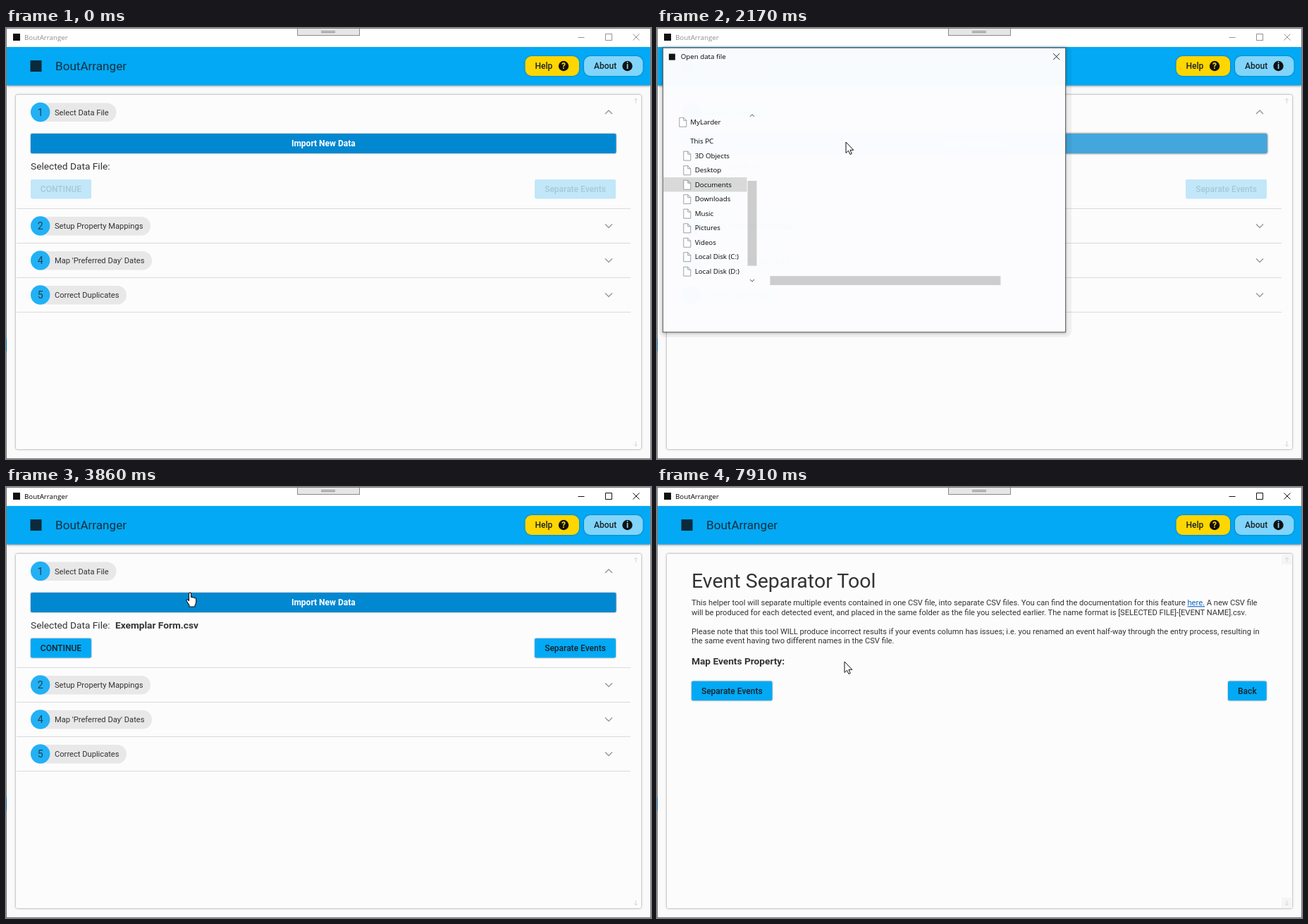
Write an HTML page that moves like this. It is 915 by 612 pixels and loops after 8000 ms.

```html
<!DOCTYPE html>
<html lang="en">
<head>
<meta charset="utf-8">
<title>BoutArranger</title>
<style>
html, body { margin: 0; width: 100%; height: 100%; overflow: hidden; background: #fafafa; }
svg { display: block; width: 915px; height: 612px; cursor: default; user-select: none; }
text { font-family: Roboto, sans-serif; font-size: 11.15px; fill: #333; white-space: pre; }
.ui { font-family: "Open Sans", "Noto Sans", sans-serif; font-size: 9.75px; fill: #000; }
.btn { font-size: 12px; font-weight: 500; fill: #16222a; text-anchor: middle; }
.mid { font-size: 13.7px; }
.bold { font-weight: 700; }
.raised { filter: drop-shadow(0 .8px 1px #0006); }
.hover { filter: drop-shadow(0 .8px 1.5px #000b); }
.line { fill: none; stroke: #9b9b9b; stroke-width: 1.5; }
.thin { fill: none; stroke: #444; stroke-width: 1; }
</style>
</head>
<body>
<svg id="stage" viewBox="0 0 915 612"></svg>
<script>
const LOOP = 8000;

// Markup helpers
const rect = (x, y, w, h, fill, more = '') =>
  `<rect x="${x}" y="${y}" width="${w}" height="${h}" fill="${fill}" ${more}/>`;
const text = (x, y, s, cls = '', more = '') => `<text x="${x}" y="${y}" class="${cls}" ${more}>${s}</text>`;
const ui = (x, y, s, more = '') => text(x, y, s, 'ui', more);
const path = (d, cls = 'line', more = '') => `<path d="${d}" class="${cls}" ${more}/>`;
const dot = (x, y, r, fill, more = '') => `<circle cx="${x}" cy="${y}" r="${r}" fill="${fill}" ${more}/>`;
const group = (id, body, more = '') => `<g id="${id}" ${more}>${body}</g>`;
const chevron = (x, y, up) => path(`M${x - 5} ${y + (up ? 2.5 : -2.5)}l5 ${up ? -5 : 5}l5 ${up ? 5 : -5}`);
const button = (x, y, w, h, label, id = '') =>
  `<g class="raised" ${id && `id="${id}"`}>${rect(x, y, w, h, '#03a9f4', 'rx="2"')}</g>` +
  text(x + w / 2, y + h / 2 + 4.2, label, 'btn');
const ghost = (x, w, label) =>
  rect(x, 215, w, 27.5, '#c1e7f8', 'rx="2"') + text(x + w / 2, 232.8, label, 'btn', 'style="fill:#a6c9d8"');

function frame() {
  const pill = (x, w, fill, label, sign) =>
    `<g class="raised">${rect(x, 40, w, 28, fill, 'rx="9"')}</g>` +
    text(x + 14, 58.4, label, 'btn', 'style="text-anchor:start"') + dot(x + w - 22, 54, 7.2, '#111') +
    text(x + w - 22, 58, sign, 'btn bold', `style="fill:${fill}"`);
  return rect(0, 0, 915, 612, '#fafafa') + rect(0, 0, 915, 27, '#fff') +
    rect(10, 8, 10, 10, '#111') + group('caption',
      ui(26, 17, 'BoutArranger') +
      path('M811.5 13.5h9M850.5 8.5h9v9h-9zM889.5 8.5l9 9m0-9l-9 9', '', 'fill="none" stroke="#111"')) +
    `<g style="filter:drop-shadow(0 1px 1.5px #0006)">${rect(1, 27, 913, 54.5, '#03a9f4')}</g>` +
    rect(34.5, 46, 16, 16, '#0b2a3a') +
    text(70, 60.3, 'BoutArranger', '', 'style="font-size:17.1px;fill:#12303f"') +
    pill(736.5, 76.5, '#ffd600', 'Help', '?') + pill(820, 83.5, '#81d4fa', 'About', 'i') +
    `<g style="filter:drop-shadow(0 .8px 1.5px #0007)">${rect(14, 95, 887, 503, '#fcfcfc', 'rx="2"')}</g>` +
    group('bars', rect(886, 96, 14, 14, '#f5f5f5') + rect(886, 583, 14, 14, '#f5f5f5')) +
    path('M893.5 107v-7m-2.5 2.5l2.5-2.5l2.5 2.5M893.5 587v7m-2.5-2.5l2.5 2.5l2.5-2.5', '', 'fill="none" stroke="#d6d6d6"') +
    rect(413.5, -1, 88, 11.5, '#e6e6e6', 'stroke="#8a8a8a"') +
    path('M447 4.5h20M447 6.5h20', '', 'stroke="#888"');
}

function stepsPage() {
  const section = ([n, label, y, right]) =>
    rect(40, y - 13, right - 40, 26.5, '#e8e8e8', 'rx="13.2"') + dot(48.7, y, 13.7, '#22b1f5') +
    text(48.7, y + 5, n, '', 'style="font-size:14.3px;text-anchor:middle;fill:#24414f"') +
    text(69, y + 4, label) + chevron(855, y, n === 1);
  return [[1, 'Select Data File', 119.5, 156.5], [2, 'Setup Property Mappings', 281, 205],
    [4, 'Map \'Preferred Day\' Dates', 330, 207], [5, 'Correct Duplicates', 379, 171]].map(section).join('') +
    [256.5, 305.5, 354.5, 403.5].map(y => path(`M15 ${y}H886`, '', 'stroke="#dadada"')).join('') +
    `<g id="import" class="raised">${rect(35, 150, 830.5, 28, '#0288d1', 'rx="2"')}</g>` +
    `<g clip-path="url(#importBox)">${dot(268, 162, 0, '#fff', 'id="ripple"')}</g>` +
    text(450.3, 168.3, 'Import New Data', 'btn bold', 'style="fill:#fff"') +
    text(35, 201, 'Selected Data File:', 'mid') +
    group('empty', ghost(35, 86, 'CONTINUE') + ghost(750, 115, 'Separate Events')) +
    group('loaded', text(155, 201, 'Exemplar Form.csv', 'mid bold') +
      button(35, 215, 86, 27.5, 'CONTINUE') + button(750, 215, 115, 27.5, 'Separate Events', 'separate') +
      `<g clip-path="url(#separateBox)">${dot(813, 231, 45, '#fff', 'id="ripple2" opacity=".26"')}</g>`);
}

function toolPage() {
  const lines = [
    'This helper tool will separate multiple events contained in one CSV file, into separate CSV files. You can find the documentation for this feature <tspan fill="#0a62c4" text-decoration="underline">here.</tspan> A new CSV file',
    'will be produced for each detected event, and placed in the same folder as the file you selected earlier. The name format is [SELECTED FILE]-[EVENT NAME].csv.',
    '',
    'Please note that this tool WILL produce incorrect results if your events column has issues; i.e. you renamed an event half-way through the entry process, resulting in',
    'the same event having two different names in the CSV file.'];
  return text(49, 143, 'Event Separator Tool', '', 'style="font-size:28.5px"') +
    lines.map((s, i) => text(49, 168.2 + i * 13.5, s)).join('') +
    text(49, 251.7, 'Map Events Property:', 'mid bold') +
    button(49, 275.7, 114.5, 27.5, 'Separate Events') + button(810, 275.7, 54.7, 27.5, 'Back');
}

const places = [['MyLarder', 133], ['This PC', 160], ['3D Objects', 181], ['Desktop', 201.6], ['Documents', 222.2],
  ['Downloads', 242.7], ['Music', 263.3], ['Pictures', 284], ['Videos', 304.5], ['Local Disk (C:)', 325], ['Local Disk (D:)', 345.6]];

function placeIcon(i, y) {
  const screen = (x, w) => rect(x, y - 5, w, 9, '#1c93dc', 'stroke="#2878a8" stroke-width=".7"');
  const disk = rect(36, y, 12, 4, '#555') + rect(37, y - 1.5, 10, 1.5, '#bbb');
  return [
    dot(35, y, 5.5, '#1683d8'),
    screen(29, 13) + rect(32, y + 5, 7, 1.2, '#567'),
    path(`M36 ${y - 3}l6-3l6 3v7l-6 2l-6-2z`, '', 'fill="#27b3d4"') + path(`M36 ${y - 3}l6 2v7l-6-2z`, '', 'fill="#7edcec"'),
    screen(36, 12),
    rect(37.5, y - 6, 9, 12, '#fff', 'stroke="#789"') + path(`M39 ${y - 2.5}h6m-6 2.5h6m-6 2.5h6`, '', 'stroke="#4a9ad0"'),
    path(`M40 ${y - 6}h4v6h4l-6 6l-6-6h4z`, '', 'fill="#2f87d6"'),
    dot(40, y + 4, 2.3, '#1488d8') + path(`M41.7 ${y + 4}v-10q0 3 4 5.5`, '', 'fill="none" stroke="#1488d8" stroke-width="1.5"'),
    rect(36, y - 4, 12, 8, '#eaf4fa', 'stroke="#789"') + path(`M37 ${y + 3.5}l4-4l3 2l3-2v4z`, '', 'fill="#3487b8"'),
    rect(36, y - 6, 12, 12, '#333') + rect(38.5, y - 5, 7, 10, '#6d83b8'),
    disk + rect(36, y - 5, 5, 3.5, '#1c9be8'),
    disk][i];
}

function dialog() {
  const blank = (x, y) => path(`M${x} ${y - 6}h6l4 4v9h-10zM${x + 6} ${y - 6}v4h4`, '', 'fill="#fff" stroke="#8a8a8a" stroke-width=".8"');
  const box = (x, y, w, h, stroke, fill = '#fff', more = '') => rect(x, y, w, h, fill, `stroke="${stroke}" ${more}`);
  const shell =
    rect(2, 24, 587, 416, '#0000000d', 'rx="9"') +
    `<g style="filter:drop-shadow(0 1px 2px #0004)">${box(7.5, 27.5, 573, 405, '#555', '#fcfdff')}</g>` +
    rect(16, 36, 9, 9, '#111') + ui(33, 43.7, 'Open data file') +
    path('M563 35.5l9 9m0-9l-9 9', '', 'stroke="#222"') +
    rect(8, 212, 119, 20.5, '#d9d9d9') + rect(128, 217, 13, 121, '#cdcdcd') + rect(160, 352.5, 328, 13, '#cdcdcd') +
    places.map(([s, y], i) => ui(i < 2 ? 46.5 : 53, y + 3.5, s)).join('') +
    path('M131.5 125.5l3-3l3 3M131.5 357.5l3 3l3-3', 'thin', 'stroke-width="1.4"');
  const early = places.map(([, y], i) => i === 1 ? '' : blank(i ? 37 : 31, y)).join('');
  const head = rect(8, 86, 572, 30, '#f5f8fc') + path('M8 115.5H580', '', 'stroke="#e3e6ea"') +
    path('M30 71h-10m4-4l-4 4l4 4M45 71h10m-4-4l4 4l-4 4', '', 'fill="none" stroke="#ccc"') +
    path('M67.5 69.5l2.5 2.5l2.5-2.5', '', 'fill="none" stroke="#ccc"') +
    path('M87.5 76v-10m-4 4l4-4l4 4', '', 'fill="none" stroke="#444" stroke-width="1.4"') +
    box(98.5, 58.5, 287, 24, '#d9d9d9') + path('M357.5 58v25', '', 'stroke="#d9d9d9"') +
    rect(103, 63, 11, 14, '#ffd968') + path('M122.5 68l-2.5 2.5l2.5 2.5M126.5 68l-2.5 2.5l2.5 2.5', 'thin') +
    ui(133, 73.7, '_BoutArranger-Data') + path('M229 67.5l2.5 2.5l-2.5 2.5', 'thin') + ui(240, 73.7, 'Input') +
    path('M340.5 69l3.5 3.5l3.5-3.5', 'thin') +
    path('M375.5 69a4 4 0 1 1-3-2.3l3 .3v-3', 'thin') +
    box(396.5, 57.5, 173, 25, '#d9d9d9') + path('M412 73l-3.5 3.5M412 73a3.5 3.5 0 1 1 5-5a3.5 3.5 0 1 1-5 5', 'thin') +
    ui(431.5, 73.7, 'Search Input', 'style="fill:#666"') +
    ui(23, 105.5, 'Organise', 'style="fill:#1e395b"') + path('M68 100.5h7l-3.5 4z', '', 'fill="#1e395b"') +
    ui(101, 105.5, 'New folder', 'style="fill:#1e395b"') +
    path('M475 98.5h3m1 0h4m2 0h4M475 102h3m1 0h4m2 0h4M475 105.5h3m1 0h4m2 0h4', '', 'stroke="#999" stroke-width="1.6"') +
    path('M497.5 100.5h7l-3.5 4z', '', 'fill="#1e395b"') +
    box(523.5, 97.5, 13, 9, '#357') + rect(531, 98, 5, 8, '#62aee0') + dot(560.5, 102, 6.5, '#0b63b8') +
    ui(560.5, 105.5, '?', 'style="fill:#fff;font-weight:700;text-anchor:middle"');
  const list = path('M377.5 116v22M501.5 116v22', '', 'stroke="#e3e6ea"') + path('M263.5 119l3-2.5l3 2.5', 'thin') +
    ui(160, 130.5, 'Name', 'style="fill:#456"') + ui(384, 130.5, 'Date modified', 'style="fill:#456"') +
    ui(507, 130.5, 'Type', 'style="fill:#456"') + rect(157, 142, 423, 19.5, '#e5f3ff', 'id="row"') +
    rect(161, 145, 12.5, 12.5, '#1b7a45') + ui(177.5, 155, 'Exemplar Form.csv') +
    ui(384, 155, '11/04/2020 2:22 PM', 'style="fill:#666"') + ui(507, 155, 'Tabulwise Cells', 'style="fill:#666"');
  const foot = path('M154 356l-3 3l3 3M572 356l3 3l-3 3', 'thin') + ui(119.5, 388, 'File name:') +
    box(170.5, 374.5, 223, 20, '#0078d7') + path('M383 383.5l3 3l3-3', 'thin') +
    group('typed', ui(174, 388, 'Exemplar Form.csv')) + rect(173, 378, 1, 13, '#111', 'id="caret"') +
    box(404.5, 374.5, 161, 19, '#adadad', '#e5e5e5') + ui(407.5, 388, 'Quindo Polls Files (*.csv)') +
    path('M554.5 382.5l3 3l3-3', 'thin') +
    box(406, 401, 72, 19, '#0078d7', '#e1e1e1', 'stroke-width="2"') + ui(441.5, 414, 'Open', 'text-anchor="middle"') +
    box(491.5, 400.5, 73, 20, '#adadad', '#e1e1e1') + ui(528, 414, 'Cancel', 'text-anchor="middle"') +
    path('M571 429.5h8M574 426.5h5M577 423.5h2', '', 'stroke="#aaa" stroke-dasharray="1.5 1.5"');
  return shell + group('early', early) +
    group('full', head + list + foot + places.map(([, y], i) => placeIcon(i, y)).join(''));
}

const pointer = dot(0, 0, 10.3, '#6db33f', 'id="press" opacity=".85"') +
  path('M0 0V15.5L3.5 12.2L6 17.5L8.3 16.5L6 11.3H10.8Z', '', 'id="arrow" fill="#fff" stroke="#111"') +
  path('M-1.5 1Q0-1 1.5 1V6.5Q3 5.5 4 7Q5.5 6.3 6.5 7.8Q8.7 7.3 8.7 9.5V13Q8.5 16 7 18V20H-1V18L-5 11.5Q-5 9-3 10L-1.5 11.5Z',
    '', 'id="hand" fill="#fff" stroke="#111" stroke-width="1.1" stroke-linejoin="round"');

document.getElementById('stage').innerHTML =
  `<defs><clipPath id="importBox">${rect(35, 150, 830.5, 28, '#000', 'rx="2"')}</clipPath>` +
  `<clipPath id="separateBox">${rect(750, 215, 115, 27.5, '#000', 'rx="2"')}</clipPath></defs>` +
  frame() + group('steps', stepsPage()) + group('tool', toolPage()) +
  rect(.5, .5, 914, 611, 'none', 'stroke="#777"') + rect(0, 441, 1, 18, '#0a6fb0') +
  group('dialog', dialog()) + group('cursor', pointer);

const el = id => document.getElementById(id);
const show = (id, on) => el(id).style.display = on ? '' : 'none';
const set = (id, name, value) => el(id).setAttribute(name, value);
const within = (t, a, b) => t >= a && t < b;
// Value of the last step reached
const at = (t, steps) => steps.reduce((v, [from, next]) => t >= from ? next : v, steps[0][1]);

// Pointer moves: start, end, number of steps, from, to
const moves = [
  [380, 1150, 10, [13, 280], [268, 162]],
  [2860, 3010, 2, [266, 158], [261, 150]],
  [4490, 5270, 10, [266, 151], [793, 228]],
  [5330, 5570, 3, [798, 228], [813, 231]],
  [6590, 7360, 10, [805, 231], [266, 248]]];

function pointerAt(t) {
  const move = moves.filter(m => t >= m[0]).pop();
  if (!move) return null;
  const [a, b, n, from, to] = move;
  const p = Math.min(1, Math.floor((t - a) / (b - a) * n + .02) / n);
  const eased = n > 3 ? p * p * (3 - 2 * p) : p;
  return from.map((v, i) => v + (to[i] - v) * eased);
}

function render(t) {
  const onTool = t >= 6190, loaded = t >= 3780;
  set('caption', 'opacity', within(t, 1380, 1540) || t >= 3630 ? 1 : .45);
  show('bars', onTool);
  show('steps', !onTool);
  show('tool', onTool);
  set('tool', 'opacity', at(t, [[6190, .45], [6280, .85], [6360, 1]]));
  show('loaded', loaded);
  show('empty', !loaded);

  set('ripple', 'r', at(t, [[0, 0], [1450, 70], [1540, 190], [2090, 650], [3010, 0]]));
  set('ripple', 'opacity', at(t, [[0, .26], [2400, .2], [2550, .14], [2700, .08], [2860, .04]]));
  show('ripple2', t >= 6040);
  set('import', 'class', within(t, 1070, 2860) || within(t, 4090, 5970) ? 'hover' : 'raised');
  set('separate', 'class', t >= 5410 ? 'hover' : 'raised');

  const alpha = at(t, [[0, 0], [2010, .3], [2090, .75], [2170, .985], [2260, 1], [3550, .85], [3630, .5], [3700, .2], [3780, 0]]);
  const scale = at(t, [[0, 1], [2010, .95], [2090, .98], [2170, .997], [2260, 1], [3550, .99], [3630, .97], [3700, .95]]);
  show('dialog', alpha > 0);
  set('dialog', 'opacity', alpha);
  set('dialog', 'transform', `translate(294 230) scale(${scale}) translate(-294 -230)`);
  show('early', t < 2260);
  show('full', t >= 2260);
  show('row', t >= 2860);
  set('row', 'fill', t >= 3470 ? '#cce8ff' : '#e5f3ff');
  show('typed', t >= 3470);
  show('caret', within(t, 3320, 3470));

  const pos = pointerAt(t);
  show('cursor', pos);
  if (!pos) return;
  const [x, y] = pos;
  const overImport = y >= 150 && y < 178.5 && (t < 2010 || loaded);
  const overSeparate = loaded && x >= 750 && y >= 215 && t < 6280;
  const hand = !onTool && overImport || overSeparate;
  set('cursor', 'transform', `translate(${x.toFixed(1)} ${y.toFixed(1)})`);
  show('hand', hand);
  show('arrow', !hand);
  show('press', within(t, 1380, 1770) || within(t, 3470, 3630) || within(t, 5970, 6280) || within(t, 7770, 7910));
}

const start = performance.now();
function loop(now) {
  render(Math.max(0, now - start) % LOOP);
  requestAnimationFrame(loop);
}
render(0);
requestAnimationFrame(loop);
</script>
</body>
</html>
```
